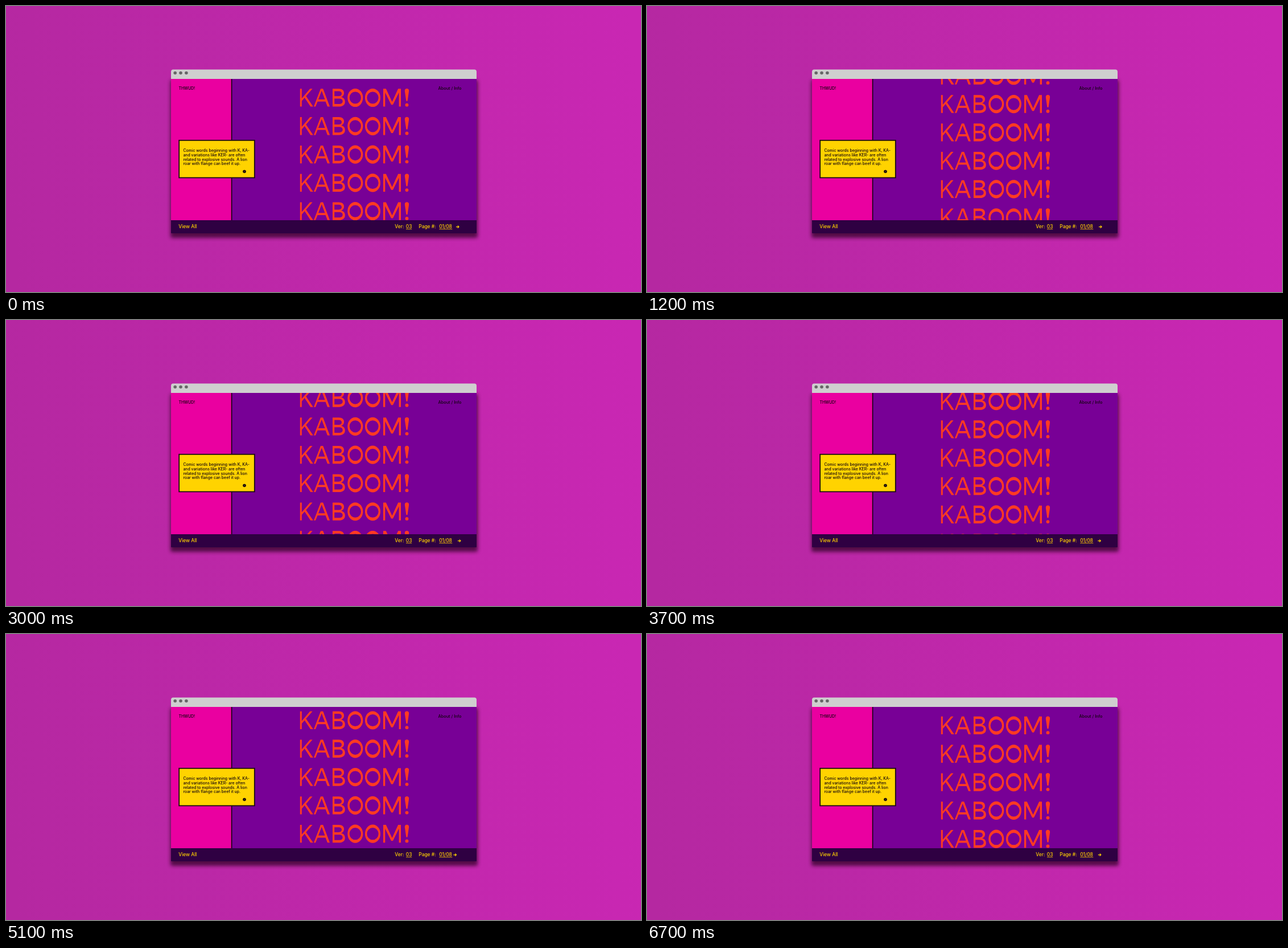
An HTML page for the animation above (6.8 s loop, 1116 by 502 pixels).

```html
<!DOCTYPE html>
<html lang="en">
<head>
<meta charset="utf-8">
<title>Comic sounds</title>
<style>
  html, body { margin: 0; width: 100%; height: 100%; overflow: hidden; background: #bf28aa; }
  svg { display: block; width: 100%; height: 100%; }
  text { font-family: Inter, "Open Sans", sans-serif; font-weight: 500; }
  .small { font-size: 6.9px; fill: #12040f; }
  .foot { font-size: 8.4px; fill: #ffd200; }
  .line { stroke: #ffd200; fill: none; }
</style>
</head>
<body>
<svg viewBox="0 0 1116 502">
  <defs>
    <linearGradient id="bg" gradientUnits="userSpaceOnUse" x1="0" y1="300" x2="1116" y2="200">
      <stop offset="0" stop-color="#b528a1"/>
      <stop offset="1" stop-color="#c927b3"/>
    </linearGradient>
    <filter id="blur" x="-10%" y="-10%" width="120%" height="120%">
      <feGaussianBlur stdDeviation="3"/>
    </filter>
    <clipPath id="page"><rect x="397" y="128" width="430" height="248"/></clipPath>
    <path id="oh" fill-rule="evenodd" d="M0 15.7a13.5 16.1 0 0 1 27 0a13.5 16.1 0 0 1-27 0z
      M3.3 15.7a10.2 10.6 0 0 0 20.4 0a10.2 10.6 0 0 0-20.4 0z"/>
    <g id="word" fill="#ff3a22">
      <path d="M516.8 0h3v17L534.3 0h4.3L527.3 13 539.8 31.3h-4.6L524.8 15.6 519.8 21.5V31.3h-3z"/>
      <path fill-rule="evenodd" d="M541 31.3L553 0h4.2L569 31.3h-4L561.6 22.5H547.6L544 31.3z
        M548.9 18.8H560.5L554.8 3.5z"/>
      <path fill-rule="evenodd" d="M574 0h11c6 0 9 3 9 7.5 0 4-2.5 6.3-5.5 7 4.5.7 7.3 3.8 7.3 8.2
        0 5.5-4 8.6-10.5 8.6H574z M577.2 4.3v8.6h7.5c3.5 0 5.3-1.6 5.3-4.3s-1.8-4.3-5.3-4.3z
        M577.2 17.2v9.6h8c4.2 0 6.5-1.6 6.5-4.8s-2.3-4.8-6.5-4.8z"/>
      <use href="#oh" x="600.3"/>
      <use href="#oh" x="631"/>
      <path d="M663 31.3V0h4.8L678.6 23 689.2 0H694V31.3h-3.4V6.5L680 28h-3L666.3 6.5V31.3z"/>
      <path d="M704.5-.3c2.5 0 4 1.6 3.6 4.5L705.6 21.5h-2.2L700.9 4.2C700.5 1.3 702-.3 704.5-.3z"/>
      <circle cx="704.5" cy="28.4" r="2.9"/>
    </g>
  </defs>

  <rect width="1116" height="502" fill="url(#bg)"/>
  <rect x="289" y="130" width="540" height="277" rx="3" fill="#25001f" opacity=".7" filter="url(#blur)"/>

  <path d="M290 128.5V115.5a4 4 0 0 1 4-4H823a4 4 0 0 1 4 4V128.5z" fill="#cfcfcf"/>
  <g fill="#666">
    <circle cx="297.2" cy="117.5" r="2.8"/>
    <circle cx="307" cy="117.5" r="2.8"/>
    <circle cx="316.9" cy="117.5" r="2.8"/>
  </g>
  <rect x="290" y="128" width="106" height="249" fill="#ea00a0"/>
  <rect x="397" y="128" width="430" height="249" fill="#780096"/>
  <rect x="395.8" y="128" width="1.6" height="249" fill="#12040f"/>

  <g clip-path="url(#page)" role="img" aria-label="KABOOM!"><g id="rows"></g></g>

  <text class="small" x="303.4" y="147.1">THWUD!</text>
  <text class="small" x="800.5" y="147.1" text-anchor="end" style="font-size:7.3px">About / Info</text>

  <rect x="304.2" y="235.8" width="132.6" height="65.6" fill="#ffd300" stroke="#1a0a10" stroke-width="1.8"/>
  <g class="small">
    <text x="311.4" y="256.2">Comic words beginning with K, KA-</text>
    <text x="311.4" y="263.9">and variations like KER- are often</text>
    <text x="311.4" y="271.5">related to explosive sounds. A lion</text>
    <text x="311.4" y="279.2">roar with flange can beef it up.</text>
  </g>
  <circle cx="419" cy="290.5" r="2.8" fill="#12040f"/>
  <path class="line" d="M418.3 291.4l1.4-1.8" stroke-width=".6"/>

  <path d="M290 376H827V398a1 1 0 0 1-1 1H291a1 1 0 0 1-1-1z" fill="#2f0042"/>
  <g class="foot">
    <text x="303.3" y="390.3">View All</text>
    <text x="683.3" y="390.3">Ver:</text>
    <text x="702.8" y="390.3">03</text>
    <text x="725.3" y="390.3">Page #:</text>
    <text x="761.2" y="390.3">01/08</text>
  </g>
  <path class="line" d="M703 391.6h10.2M761.3 391.6h23" stroke-width=".8"/>
  <path id="arrow" class="line" d="M-5.6 0H-.6M-2.8-2.3L-.5 0L-2.8 2.3" stroke-width="1.1"/>
</svg>
<script>
  const LOOP = 6800, STEP = 100, PITCH = 49.8, TOP = 145.3;
  const rows = document.getElementById('rows');
  const arrow = document.getElementById('arrow');

  for (let i = -1; i < 5; i++) {
    const word = document.createElementNS('http://www.w3.org/2000/svg', 'use');
    word.setAttribute('href', '#word');
    word.setAttribute('y', TOP + i * PITCH);
    rows.appendChild(word);
  }

  const move = (el, x, y) => el.setAttribute('transform', `translate(${x.toFixed(2)} ${y.toFixed(2)})`);

  function draw(now) {
    const t = Math.floor((now % LOOP) / STEP) * STEP;
    // The scroll slows down slightly over each loop.
    const p = t / LOOP;
    move(rows, 0, PITCH * p + 15.7 * p * (1 - p));
    // The arrow bounces on its own period and restarts with the loop.
    const u = ((t + 1000) / 6100) % 1;
    move(arrow, 792 + 8.3 * 4 * u * (1 - u), 387.6);
  }

  const start = performance.now();
  function tick() {
    draw(performance.now() - start);
    requestAnimationFrame(tick);
  }
  tick();
</script>
</body>
</html>
```
